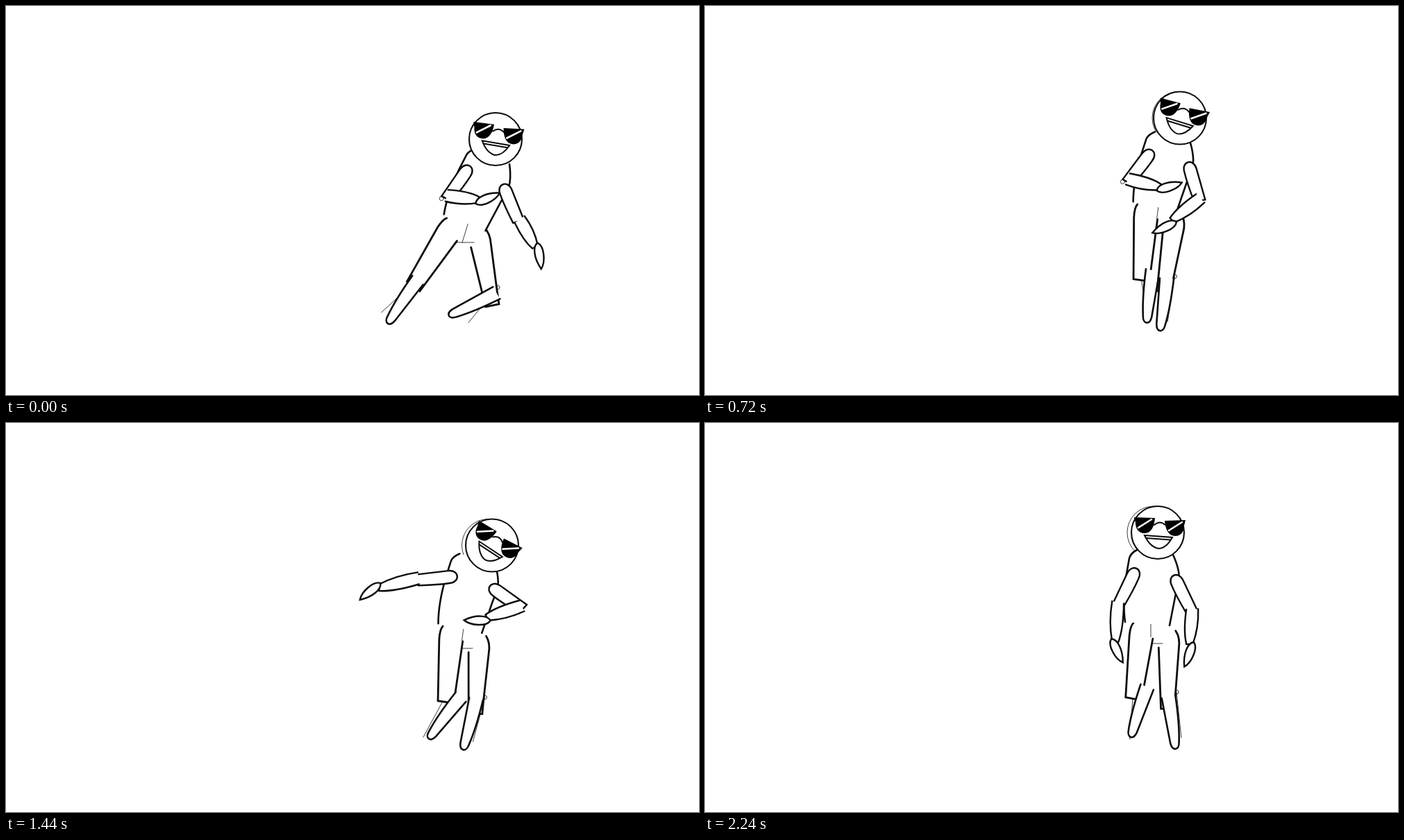
An HTML page with a canvas for the animation above (2.4 s loop, 998 by 561 pixels).

```html
<!DOCTYPE html>
<html lang="en">
<head>
<meta charset="utf-8">
<title>Dancer</title>
<style>
  html, body { margin: 0; width: 100%; height: 100%; overflow: hidden; background: #fff; }
  canvas { display: block; }
</style>
</head>
<body>
<canvas id="stage" width="998" height="561"></canvas>
<script>
const ctx = document.getElementById('stage').getContext('2d');
const LOOP = 2400, STEP = 40, INK = '#0c0c0c';

// body: hip x, hip y, lean    head: x, y, tilt, ghost shift
// arm:  upper, forearm, forearm length, hand
// leg:  thigh, shin, knee x, knee y, bone    slide: left shoulder, left hip
const poses = [];
function pose(t, changes) {
  poses.push({ ...poses[poses.length - 1], ...changes, t });
}

pose(0, {
  body: [657, 341, 17], head: [705, 192, 5.4, 0],
  armL: [35.7, -82.5, 44.5, -112.4], armR: [-23, -29.5, 44, -9.5],
  legL: [32, 34, 2, 70, 47.6], legR: [-26.9, 65, -6, 79, 39.6], slide: [0, -12]
});
pose(80, { legL: [42, 45, 2, 70, 62] });
pose(320, {
  body: [652, 331, 17.5], head: [705, 185, 12.2, 0],
  armL: [41.2, -87.5, 43, -118], armR: [-13, -13, 42, -5],
  legL: [5, -39, -5, 75, -38], legR: [-20.2, 33.7, -8, 70, 26], slide: [0, 0]
});
pose(560, {
  body: [650, 321, 13], head: [690, 168, 6.1, 0],
  armL: [30.8, -114, 44, -141.8], armR: [-5, 25, 44, 35.9],
  legL: [-1.5, -13, 16, 65, -29], legR: [-9.6, 10.9, -13, 75, 12]
});
pose(720, {
  body: [649, 318, 8], head: [684, 161.5, 13, -2],
  armL: [38, -76, 46, -106], armR: [-17, 52, 50, 64],
  legL: [3, 6, 17, 66, -9], legR: [-7.5, 8, -12, 75, 9]
});
pose(880, {
  body: [649, 321, 4], head: [680, 167.5, 21.4, -5],
  armL: [43.7, -36, 47, -69.6], armR: [-28, 80, 54, 91.6],
  legL: [7, 24, 18, 66, 10], legR: [-5.5, 6, -12, 74, 6]
});
pose(1080, {
  body: [656, 326, 10], head: [708, 181, 35.6, -5],
  armL: [98, 80.5, 56, 48.2], armR: [-57, 93, 52, 115],
  legL: [3.5, 40.7, 22, 74, 33], legR: [-11.9, 20.4, -12, 71, 21], slide: [-6, 0]
});
pose(1200, {
  body: [659, 327, 11], head: [713, 183, 36, -5],
  armL: [97, 86, 57, 66], armR: [-63, 92, 52, 113]
});
pose(1680, {
  body: [651, 323, 4.5], head: [687, 170, 22.4, -6],
  armL: [72, 67, 56.5, 38.7], armR: [-48, 51, 51, 66.2],
  legL: [4, 33, 22, 70, 24], legR: [-14.4, 9.5, -14, 74, 9], slide: [0, 0]
});
pose(1840, {
  body: [642, 318, 0], head: [652, 158, 0, -6],
  armL: [26.6, 4, 55, -24.6], armR: [-26.6, 4.3, 49, 19.4],
  legL: [6, 17.4, 19, 62, 4], legR: [-15.2, -7, -13, 77, -6]
});

const shapes = {
  torso: 'M-20 -135Q-29 -130 -31 -123L-35 -100Q-41 -60 -37 -31L27 -26L36 -72Q42 -95 40 -104Q38 -115 32 -128Z',
  torsoEdges: 'M-20 -135Q-29 -130 -31 -123L-35 -100Q-41 -60 -37 -31M27 -26L36 -72Q42 -95 40 -104Q38 -115 32 -128',
  upperArm: 'M-8 51L-9 4C-9 -12 9 -12 9 4Q10 20 8 49Z',
  forearm: 'M-8 0Q-11 28 -4 52L5 53Q11 35 9 2',
  hand: 'M0 -1C8 3 9 20 1 37C-7 28 -9 5 0 -1Z',
  thighL: 'M-10 -29Q-14 -24 -14 -10L-10 79L13 81L20 -9',
  thighR: 'M22 -13C25 -4 23 5 20 12L-3 77L-9 95L-28 90L-8 4',
  shin: 'M-10 0L-5.5 66C-4 78 6 78 7 66Q11 40 10 -2',
  lens: 'M-34 -22L-4 -21C-5 -8 -10 1 -19 1C-28 1 -32 -6 -32 -14Z',
  mouth: 'M-19 4L21 7Q12 23 1 23Q-11 21 -19 4ZM-16 8L18 10.5',
  bridge: 'M-5 -11Q3 -18 11 -11',
  glint: 'M-28 -7L-9 -19'
};
for (const k in shapes) shapes[k] = new Path2D(shapes[k]);

const rad = a => a * Math.PI / 180;

function at([ox, oy], a, x, y) {
  const c = Math.cos(rad(a)), s = Math.sin(rad(a));
  return [ox + x * c - y * s, oy + x * s + y * c];
}

function place([x, y], a, draw, sx = 1, sy = 1) {
  ctx.save();
  ctx.translate(x, y);
  ctx.rotate(rad(a));
  ctx.scale(sx, sy);
  draw();
  ctx.restore();
}

function line(path, width = 2.4, color = INK) {
  ctx.lineWidth = width;
  ctx.strokeStyle = color;
  ctx.stroke(path);
}

function solid(path, width) {
  ctx.fillStyle = '#fff';
  ctx.fill(path);
  line(path, width);
}

function thinLine(a, b) {
  const p = new Path2D();
  p.moveTo(...a);
  p.lineTo(...b);
  line(p, 0.8);
}

function circle([x, y], r) {
  const p = new Path2D();
  p.arc(x, y, r, 0, 7);
  return p;
}

function bone(hip, [thigh, , , , shin]) {
  const knee = at(hip, thigh, 0, 72.7);
  thinLine(knee, at(knee, shin, 0, 66));
  line(circle(knee, 3), 0.8);
}

function leg(hip, [thigh, shin, kx, ky], shape, side) {
  place(hip, thigh, () => solid(shape, 2.8));
  place(at(hip, thigh, kx, ky), shin, () => solid(shapes.shin, 2.6), side);
}

function arm(shoulder, [upper, fore, length, hand], side) {
  const elbow = at(shoulder, upper, -3 * side, 47);
  const wrist = at(elbow, fore, -5 * side, length);
  place(shoulder, upper, () => solid(shapes.upperArm), side);
  place(elbow, fore, () => solid(shapes.forearm), side, length / 50);
  place(wrist, hand, () => solid(shapes.hand), side);
}

function lens(x, y, side) {
  place([x, y], 0, () => {
    ctx.fillStyle = '#000';
    ctx.fill(shapes.lens);
  }, side);
}

function face() {
  lens(0, 0, 1);
  lens(6, 4, -1);
  line(shapes.bridge, 2);
  line(shapes.glint, 2.6, '#fff');
  place([44, 4], 0, () => line(shapes.glint, 2.6, '#fff'));
  line(shapes.mouth, 2);
}

function poseAt(t) {
  const i = poses.findIndex(p => p.t > t);
  if (i < 0) return poses[poses.length - 1];
  const a = poses[i - 1], b = poses[i], k = (t - a.t) / (b.t - a.t), out = {};
  for (const key in a) {
    if (key !== 't') out[key] = a[key].map((v, j) => v + (b[key][j] - v) * k);
  }
  return out;
}

function draw(t) {
  const { body, head, armL, armR, legL, legR, slide } = poseAt(t);
  const lean = body[2];
  const hipL = at(body, lean, -18, 0), hipR = [body[0] + 18, body[1]];
  const shoulderL = at(body, lean, -24, -101), shoulderR = at(body, lean, 36.5, -91);
  hipL[0] += slide[1];
  shoulderL[0] += slide[0];

  ctx.fillStyle = '#fff';
  ctx.fillRect(0, 0, 998, 561);
  ctx.lineCap = 'round';

  thinLine(body, at(body, lean, 0, -100));
  thinLine([body[0] - 18, body[1]], hipR);
  bone(hipL, legL);
  bone(hipR, legR);
  line(circle(at(shoulderL, armL[0], -6, 54), 3), 0.8);
  line(circle([head[0] + head[3], head[1]], 38), 0.8);

  leg(hipL, legL, shapes.thighL, -1);
  leg(hipR, legR, shapes.thighR, 1);
  place(body, lean, () => {
    ctx.fillStyle = '#fff';
    ctx.fill(shapes.torso);
    line(shapes.torsoEdges, 2.6);
  });
  solid(circle(head, 38), 2.1);
  place(head, head[2], face);
  arm(shoulderL, armL, 1);
  arm(shoulderR, armR, -1);
}

const start = performance.now();
function tick() {
  const t = (performance.now() - start) % LOOP;
  draw(Math.floor(t / STEP) * STEP);
  requestAnimationFrame(tick);
}
tick();
</script>
</body>
</html>
```
